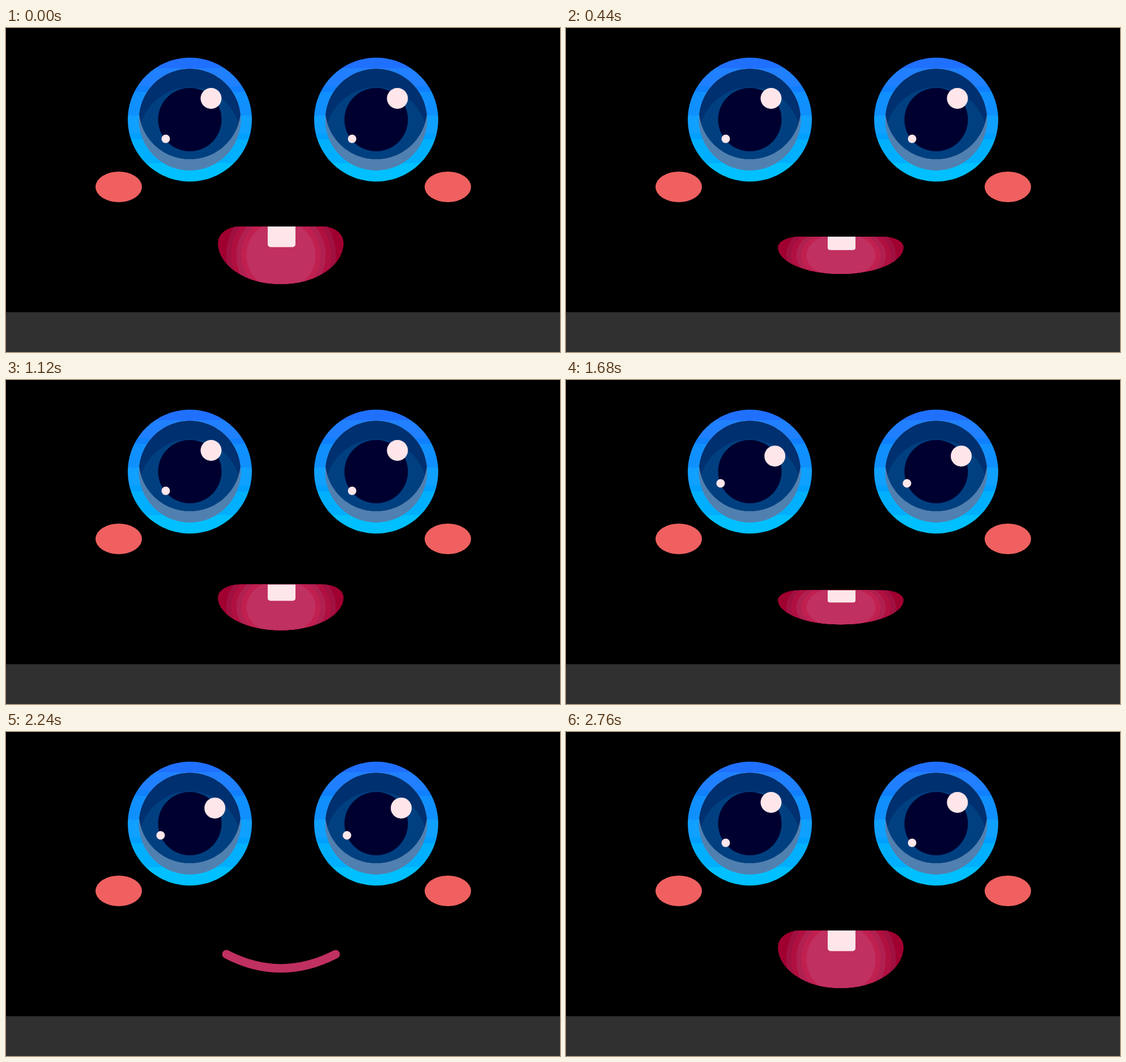
Animation, 978 px wide and 573 px high, one loop 2.84 s. Source, as an HTML page with a canvas:

```html
<!DOCTYPE html>
<html lang="en">
<head>
<meta charset="utf-8">
<title>Happy face</title>
<style>
  html, body { margin: 0; width: 100%; height: 100%; overflow: hidden; background: #000; }
  canvas { display: block; }
</style>
</head>
<body>
<canvas id="stage" width="978" height="573"></canvas>
<script>
const ctx = document.getElementById('stage').getContext('2d');
const LOOP = 2840, STEP = 40;
const EYE = { x: 324.5, y: 162, gap: 329 };
const WHITE = '#ffe6ea';
const TONGUE = [192, 48, 96], LIP = [160, 0, 48];

// Keyframes are [time, value] pairs, eased in and out.
const squint = [[1680, 0], [1880, 1], [2060, 1], [2240, 0]];
const mouthOpen = [[0, 1], [575, .588], [680, .588], [840, 1], [1400, .588],
                   [1650, .588], [2150, 1], [2320, .588], [2480, 1]];
const glintTurn = [[1240, 0], [1400, 15], [2320, 15], [2480, 0]];
const glintSize = [[680, 1], [840, 1.47], [1080, 1]];

// Each layer is a circle that squints into an arched, blunt ellipse.
const rim = { r: 109.5, y: 124, rx: 104, ry: 56, bend: 36, tilt: 2 };
const iris = { r: 90, y: 124, rx: 87.5, ry: 41, bend: 30, tilt: 3 };
const pupil = { r: 56, y: 115.5, rx: 83, ry: 11.5, bend: 38, tilt: 3 };

const mouthShape = new Path2D('M374 380A38 29 0 0 1 412 351H560A36 29 0 0 1 596 380A111 73 0 0 1 374 380Z');
const smileLine = new Path2D('M389 393Q485 443 582 393');

const mix = (a, b, u) => a + (b - a) * u;

function valueAt(t, keys) {
  const next = keys.findIndex(key => key[0] > t);
  if (next === 0) return keys[0][1];
  if (next < 0) return keys[keys.length - 1][1];
  const [t0, a] = keys[next - 1], [t1, b] = keys[next];
  const u = (t - t0) / (t1 - t0);
  return mix(a, b, u * u * (3 - 2 * u));
}

// Colour ramp with every channel rounded to coarse steps, which makes bands.
function ramp(from, to, u) {
  const channels = from.map((c, i) => Math.round(mix(c, to[i], u) / 16) * 16);
  return `rgb(${channels.join()})`;
}

function layerPath(layer, m, dy = 0) {
  const path = new Path2D();
  for (let deg = 0; deg < 360; deg += 2) {
    const c = Math.cos(deg * Math.PI / 180), s = Math.sin(deg * Math.PI / 180);
    const blunt = Math.sign(s) * Math.abs(s) ** .45;
    const arched = layer.y + layer.ry * blunt + layer.bend * c * c - layer.tilt * c;
    path.lineTo(EYE.x + mix(layer.r, layer.rx, m) * c,
                mix(EYE.y + layer.r * s, arched, m) + dy);
  }
  path.closePath();
  return path;
}

function fill(color, path) {
  ctx.fillStyle = color;
  ctx.fill(path);
}

function ellipse(color, x, y, rx, ry = rx) {
  ctx.fillStyle = color;
  ctx.beginPath();
  ctx.ellipse(x, y, rx, ry, 0, 0, 2 * Math.PI);
  ctx.fill();
}

function drawGlints(t, m) {
  const size = valueAt(t, glintSize), visible = Math.max(0, 1 - 2 * m);
  ctx.save();
  ctx.translate(318, 191);
  ctx.scale(size, size);
  ctx.translate(327.5 - 318, 155 - 191);
  ctx.rotate(valueAt(t, glintTurn) * Math.PI / 180);
  ellipse(WHITE, 34.5, -30.5, 18.5 * visible);
  ellipse(WHITE, -45.5, 41, 7.5 * visible);
  ctx.restore();
}

function drawEye(t, offset) {
  const m = valueAt(t, squint);
  const irisPath = layerPath(iris, m);
  ctx.save();
  ctx.translate(offset, 0);

  ctx.save();
  ctx.clip(layerPath(rim, m));
  const shift = Math.round(14 * m);
  for (let y = 50; y < 275; y++) {
    ctx.fillStyle = ramp([34, 112, 255], [-6, 192, 255], (y - 50) / 210);
    ctx.fillRect(EYE.x - 112, y + shift, 224, 1);
  }
  ctx.restore();

  fill('#5080b0', irisPath);
  ctx.save();
  ctx.clip(irisPath);
  ctx.clip(layerPath(iris, m, mix(-20, -14, m)));
  fill('#003070', irisPath);
  fill('#004080', layerPath(iris, m, mix(33, 24, m)));
  ctx.restore();

  fill('#000030', layerPath(pupil, m));
  drawGlints(t, m);
  ctx.restore();
}

function drawMouth(t) {
  if (t >= 2240 && t < 2360) {
    ctx.strokeStyle = ramp(TONGUE, TONGUE, 0);
    ctx.lineWidth = 15;
    ctx.lineCap = 'round';
    ctx.stroke(smileLine);
    return;
  }
  ctx.save();
  ctx.translate(0, 402);
  ctx.scale(1, valueAt(t, mouthOpen));
  ctx.translate(0, -402);
  fill(ramp(LIP, LIP, 0), mouthShape);
  ctx.clip(mouthShape);
  for (let ring = 1; ring <= 5; ring++) {
    ellipse(ramp(LIP, TONGUE, ring / 5), 485.5, 402, 106 - 9 * ring);
  }
  ctx.fillStyle = WHITE;
  ctx.beginPath();
  ctx.roundRect(462, 351, 49, 36.5, [0, 0, 5, 5]);
  ctx.fill();
  ctx.restore();
}

function draw(t) {
  ctx.fillStyle = '#000';
  ctx.fillRect(0, 0, 978, 573);
  ctx.fillStyle = '#303030';
  ctx.fillRect(0, 502.6, 978, 71);
  drawEye(t, 0);
  drawEye(t, EYE.gap);
  ellipse('#f06060', 199, 281, 41, 27);
  ellipse('#f06060', 780, 281, 41, 27);
  drawMouth(t);
}

const start = performance.now();
function tick() {
  const t = (performance.now() - start) % LOOP;
  draw(Math.floor(t / STEP) * STEP);
  requestAnimationFrame(tick);
}
tick();
</script>
</body>
</html>
```
